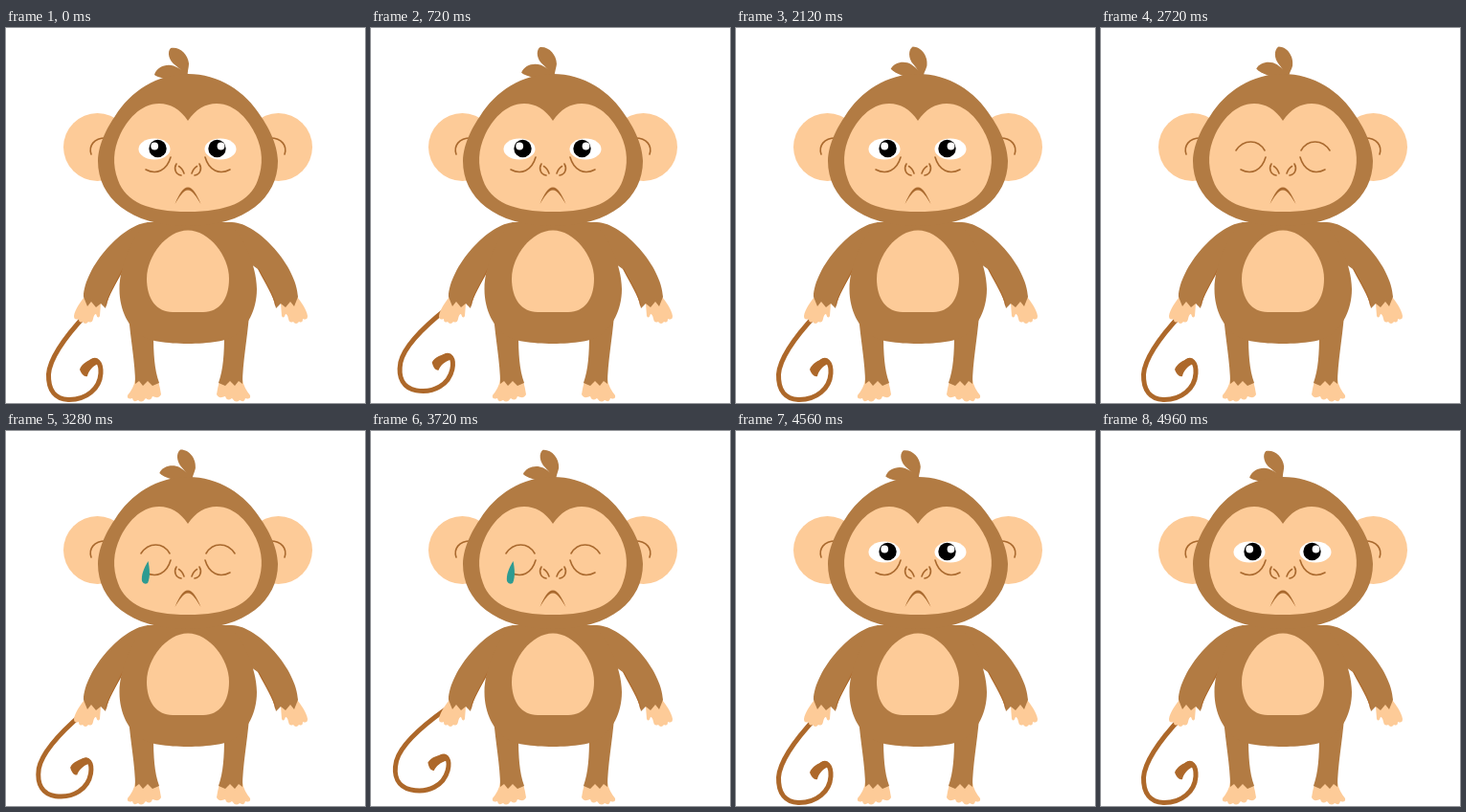
An HTML page with a canvas that plays this animation: 375x392 px, repeating every 5000 ms.

```html
<!DOCTYPE html>
<html lang="en">
<head>
<meta charset="utf-8">
<title>Sad monkey</title>
<style>
html, body { margin: 0; width: 100%; height: 100%; overflow: hidden; background: #fff; }
canvas { display: block; }
</style>
</head>
<body>
<canvas id="stage" width="375" height="392"></canvas>
<script>
const ctx = document.getElementById('stage').getContext('2d');
const LOOP = 5000;
const FUR = '#b27b43', SKIN = '#fdcb98', LINE = '#a9692e', TAIL = '#ad682a';

const shapes = {
  tail: 'M84 299C70 314 46 341 44.5 362C44 379 52 388 65 388.5C84 389 98 377 99 361C99.5 349 94 345 89 349',
  tailTip: 'M93 345C86 347 79 351 77 357C79 362 82 365 85 364C86 359 90 354 96 351Z',
  topLeaf: 'M188 53C186 46 182 43 177 39C170 34 168 25 172 21C181 19 190 27 191 37C191 42 189 46 190 53Z',
  sideLeaf: 'M192 53C175 54.500 160 53 155 49C157 41 167 37 175 39.500C182 42 187 46 192 50Z',
  head: 'M190 48C158 48 130 66 114 92C107 102 96.500 120 96 139C96 177 129 207 190 207C251 207 284 177 284 139C283.500 120 273 102 266 92C250 66 222 48 190 48Z',
  face: 'M190 97C182 85 172 79 160 79C140 79 126 97 119 112C112 127 111 143 117 159C125 182 149 192 190 192C231 192 255 182 263 159C269 143 268 127 261 112C254 97 240 79 220 79C208 79 198 85 190 97Z',
  body: 'M148 203L232 203C246 214 262 247 262 273C262 296 251 313 240 321C226 333 154 333 140 321C129 313 118.500 296 118.500 273C118.500 247 134 214 148 203Z',
  belly: 'M190 211.500C168 211.500 147 238 147 262C147 283 157 297 174 297L206 297C223 297 233 283 233 262C233 238 212 211.500 190 211.500Z',
  arm: 'M160 203L150 203C122 204 82 250 81 281L85 291L89 286L94 292L99 288L104 293C106 280 115 268 123 252L160 225Z',
  armEdge: 'M104.500 290C106 280 114 268 122 252',
  hand: 'M82 281C78 286 72 294 71 301Q71 306 76 304Q76 309 80 307Q83 311 86 307Q90 309 91 304Q92 299 94 299Q96 305 98 301L99 288Z',
  leg: 'M128 300C130 325 135 350 135 372L139 369L143 374L148 369L153 374L160 371C155 357 154 340 154 320L154 300Z',
  foot: 'M135 367C134 374 131 379 127 384Q126 389 132 387Q133 392 138 389Q142 393 146 387Q151 391 153 385Q160 388 162 383Q161 376 159 369Z',
  nostril: 'M178 142C175 147 177 153 183 154M180.500 144.500C183 146 185 149 186 152',
  earLine: 'M104 115C92 115 86 123 89 132',
  eyeBag: 'M146 148C157 154 168 149 172 135',
  lid: 'M141 128C149 116 164 116 171 128',
  mouth: 'M176.500 184C181 173 185 166.500 190 166.500C195 166.500 199 173 203.500 184C199 177 195 169.500 190 169.500C185 169.500 181 177 176.500 184Z',
  tear: 'M148.500 136C144 143 141 151 142 157Q144 161 148 159C151 153 150 143 148.500 136Z'
};
for (const name in shapes) shapes[name] = new Path2D(shapes[name]);

function fill(name, color) {
  ctx.fillStyle = color;
  ctx.fill(shapes[name]);
}

function stroke(name, color = LINE, width = 1.6) {
  ctx.strokeStyle = color;
  ctx.lineWidth = width;
  ctx.stroke(shapes[name]);
}

function ellipse(x, y, rx, ry, color) {
  ctx.fillStyle = color;
  ctx.beginPath();
  ctx.ellipse(x, y, rx, ry, 0, 0, Math.PI * 2);
  ctx.fill();
}

function bothSides(axis, draw) {
  draw();
  ctx.save();
  ctx.translate(2 * axis, 0);
  ctx.scale(-1, 1);
  draw();
  ctx.restore();
}

function rotated(x, y, angle, draw) {
  ctx.save();
  ctx.translate(x, y);
  ctx.rotate(angle);
  ctx.translate(-x, -y);
  draw();
  ctx.restore();
}

// Slow lift for 1200 ms, then a return twice as fast.
function swing(t) {
  if (t < 0 || t > 1800) return 0;
  return t < 1200 ? t / 1200 : (1800 - t) / 600;
}

function openEye(whiteX, pupilX, glintX) {
  ellipse(whiteX, 126.5, 16.5, 11, '#fff');
  ellipse(pupilX, 126, 9.2, 9.2, '#000');
  ellipse(glintX, 123.5, 3.9, 3.9, '#fff');
}

function drawFace(t) {
  fill('face', SKIN);
  bothSides(190, () => {
    stroke('nostril');
    stroke('eyeBag');
  });
  fill('mouth', LINE);
  if (t > 2700 && t < 3950) {
    bothSides(190, () => stroke('lid'));
  } else {
    openEye(155, 158.5, 155.2);
    openEye(224, 220.5, 224.5);
  }

  const tear = Math.min((t - 2800) / 250, (4200 - t) / 300, 1);
  if (tear > 0) {
    ctx.globalAlpha = tear;
    fill('tear', '#2e9b91');
    ctx.globalAlpha = 1;
  }
}

function draw(t) {
  ctx.fillStyle = '#fff';
  ctx.fillRect(0, 0, 375, 392);
  ctx.lineCap = ctx.lineJoin = 'round';

  const tailAngle = 0.25 * Math.max(swing(t), swing(t - 2750));
  rotated(120, 265, tailAngle, () => {
    stroke('tail', TAIL, 5);
    fill('tailTip', TAIL);
  });

  bothSides(193, () => {
    fill('hand', SKIN);
    fill('arm', FUR);
    stroke('armEdge', TAIL, 1);
  });
  bothSides(191, () => {
    fill('foot', SKIN);
    fill('leg', FUR);
  });
  fill('body', FUR);
  fill('belly', SKIN);

  bothSides(190, () => {
    ellipse(95.5, 124.5, 35.5, 35.5, SKIN);
    stroke('earLine');
  });
  const hairAngle = 0.27 * (1 - Math.abs(t - 2500) / 2500);
  rotated(185, 75, hairAngle, () => {
    fill('topLeaf', FUR);
    fill('sideLeaf', FUR);
  });
  fill('head', FUR);
  drawFace(t);
}

function tick() {
  draw(performance.now() % LOOP);
  requestAnimationFrame(tick);
}
tick();
</script>
</body>
</html>
```
